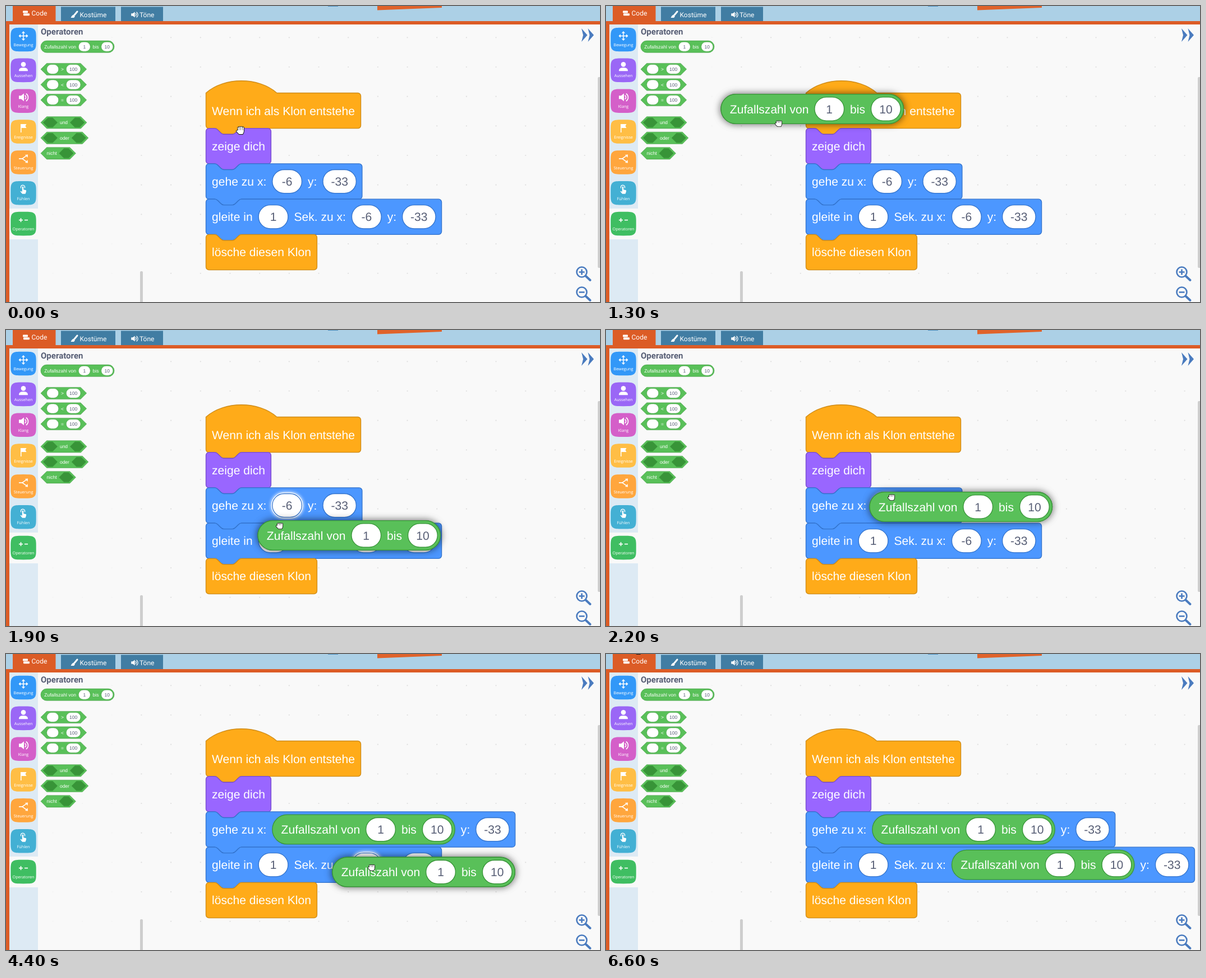
These frames come from a looping animation (1059 px wide and 529 px high, 6.9 s). An HTML page with a canvas:

```html
<!DOCTYPE html>
<html lang="de">
<head>
<meta charset="utf-8">
<title>Blöcke ziehen</title>
<style>
html, body { margin: 0; width: 100%; height: 100%; overflow: hidden; background: #f9f9f9; }
canvas { display: block; }
</style>
</head>
<body>
<canvas id="stage" width="1059" height="529"></canvas>
<script>
const ctx = document.getElementById('stage').getContext('2d');
ctx.textRendering = 'geometricPrecision';

const LOOP = 6900;
const ZOOM = 1.317;          // script scale: pixels per block unit
const PALETTE_ZOOM = 0.53;
const ROW = 48, GAP = 8;     // block units
const BLOCK_FONT = '"Liberation Sans", Arial, sans-serif';
const UI_FONT = 'Roboto, sans-serif';
const ORANGE = ['#ffab19', '#cf8b17'];
const PURPLE = ['#9966ff', '#774dcb'];
const BLUE = ['#4c97ff', '#3373cc'];
const GREEN = ['#59c059', '#389438'];
const INK = '#575e75';
const FRAME = '#dc5c26', TAB = '#417da3', CONTROL = '#4a7bbf', BAR = '#cecece';

// ---------- helpers ----------
function at(x, y, scale, draw) {
  ctx.save();
  ctx.translate(x, y);
  ctx.scale(scale, scale);
  draw();
  ctx.restore();
}

function text(str, x, y, size, color = '#fff', align = 'left', family = BLOCK_FONT, weight = 400) {
  ctx.font = `${weight} ${size}px ${family}`;
  ctx.fillStyle = color;
  ctx.textAlign = align;
  ctx.fillText(str, x, y);
}

function rect(x, y, w, h, fill, r = 0) {
  ctx.beginPath();
  ctx.roundRect(x, y, w, h, r);
  ctx.fillStyle = fill;
  ctx.fill();
}

function disc(x, y, r, fill) {
  ctx.beginPath();
  ctx.arc(x, y, r, 0, 7);
  ctx.fillStyle = fill;
  ctx.fill();
}

function poly(points, fill) {
  ctx.beginPath();
  points.forEach(([x, y]) => ctx.lineTo(x, y));
  ctx.closePath();
  ctx.fillStyle = fill;
  ctx.fill();
}

function line(points, color, width, cap = 'butt') {
  ctx.beginPath();
  points.forEach(([x, y]) => ctx.lineTo(x, y));
  outline(color, width, cap);
}

function outline(color, width = 1, cap = 'butt') {
  ctx.strokeStyle = color;
  ctx.lineWidth = width;
  ctx.lineCap = cap;
  ctx.lineJoin = 'round';
  ctx.stroke();
}

function pill(x, cy, w, h, [fill, stroke], width = 1) {
  rect(x, cy - h / 2, w, h, fill, h / 2);
  if (stroke) outline(stroke, width);
}

function hexagon(x, cy, w, h, [fill, stroke]) {
  const p = h / 2, r = x + w;
  poly([[x, cy], [x + p, cy - p], [r - p, cy - p], [r, cy], [r - p, cy + p], [x + p, cy + p]], fill);
  outline(stroke);
}

function withShadow(color, blur, draw) {
  ctx.save();
  ctx.shadowColor = color;
  ctx.shadowBlur = blur;
  draw();
  ctx.restore();
}

// ---------- block contents: a string, {num}, {slot} or {round: [...]} ----------
const PADDING = {
  round: { label: 12, num: 4 },
  hex: { label: 20, num: 20, slot: 8 },
  stack: { label: 8, num: 8, round: 8 }
};
const kind = piece => typeof piece === 'string' ? 'label' : Object.keys(piece)[0];

function textWidth(str) {
  ctx.font = `16px ${BLOCK_FONT}`;
  return ctx.measureText(str).width;
}

const WIDTH = {
  label: textWidth,
  num: p => Math.max(40, textWidth(p.num) + 22),
  slot: () => 48,
  round: p => rowWidth(p.round, 'round')
};
const pieceWidth = piece => WIDTH[kind(piece)](piece);

function rowWidth(pieces, shape) {
  const pads = PADDING[shape];
  const inner = pieces.reduce((sum, p) => sum + pieceWidth(p) + GAP, -GAP);
  return pads[kind(pieces[0])] + inner + pads[kind(pieces.at(-1))];
}

function drawRow(pieces, shape, x, cy, stroke) {
  x += PADDING[shape][kind(pieces[0])];
  for (const piece of pieces) {
    const w = pieceWidth(piece);
    DRAW[kind(piece)](piece, x, cy, w, stroke);
    x += w + GAP;
  }
}

const DRAW = {
  label: (str, x, cy) => text(str, x, cy + 5.7, 16),
  num(p, x, cy, w, stroke) {
    if (p.glow) withShadow('#fff', 6, () => pill(x, cy, w, 32, ['#fff', '#fff'], 3));
    pill(x, cy, w, 32, ['#fff', stroke]);
    text(p.num, x + w / 2, cy + 5.7, 16, INK, 'center');
  },
  slot: (p, x, cy, w, stroke) => hexagon(x, cy, w, 32, [stroke, stroke]),
  round(p, x, cy, w) {
    pill(x, cy, w, 40, GREEN);
    drawRow(p.round, 'round', x, cy, GREEN[1]);
  }
};

const num = (value, glow) => ({ num: value, glow });
const RANDOM = { round: ['Zufallszahl von', num('1'), 'bis', num('10')] };
const SLOT = { slot: true };

// ---------- script ----------
function blockPath(w, hat, cap) {
  const notch = 'c2,0 3,1 4,2l4,4c1,1 2,2 4,2h12c2,0 3,-1 4,-2l4,-4c1,-1 2,-2 4,-2';
  const back = 'H48c-2,0 -3,1 -4,2l-4,4c-1,1 -2,2 -4,2h-12c-2,0 -3,-1 -4,-2l-4,-4c-1,-1 -2,-2 -4,-2';
  const top = hat ? 'M0,0c25,-22 71,-22 96,0' : 'M0,4a4,4 0 0 1 4,-4H12' + notch;
  return new Path2D(`${top}H${w - 4}a4,4 0 0 1 4,4V44a4,4 0 0 1 -4,4${cap ? '' : back}H4a4,4 0 0 1 -4,-4z`);
}

function script(t) {
  const first = t >= 4000 ? RANDOM : num('-6', t >= 1600);
  const second = t >= 5000 ? RANDOM : num('-6', t >= 4400);
  const rows = [
    [ORANGE, 'Wenn ich als Klon entstehe'],
    [PURPLE, 'zeige dich'],
    [BLUE, 'gehe zu x:', first, 'y:', num('-33')],
    [BLUE, 'gleite in', num('1'), 'Sek. zu x:', second, 'y:', num('-33')],
    [ORANGE, 'lösche diesen Klon']
  ];
  at(356.5, 155.5, ZOOM, () => rows.forEach(([[fill, stroke], ...pieces], i) => {
    const path = blockPath(rowWidth(pieces, 'stack'), i === 0, i === rows.length - 1);
    ctx.fillStyle = fill;
    ctx.fill(path);
    ctx.strokeStyle = stroke;
    ctx.lineWidth = 1;
    ctx.stroke(path);
    drawRow(pieces, 'stack', 0, ROW / 2, stroke);
    ctx.translate(0, ROW);
  }));
}

function draggedBlock(x, y) {
  at(x, y, ZOOM, () => {
    const w = pieceWidth(RANDOM);
    withShadow('rgba(0,0,0,.6)', 13, () => pill(0, 0, w, 40, GREEN));
    DRAW.round(RANDOM, 0, 0, w);
  });
}

// ---------- palette ----------
function palette() {
  text('Operatoren', 62, 51.3, 15, INK, 'left', UI_FONT, 700);
  at(62, 72.7, PALETTE_ZOOM, () => DRAW.round(RANDOM, 0, 0, pieceWidth(RANDOM)));
  const compare = ['>', '<', '='].map(op => [num(''), op, num('100')]);
  const logic = [[SLOT, 'und', SLOT], [SLOT, 'oder', SLOT], ['nicht', SLOT]];
  [compare, logic].forEach((group, g) => group.forEach((pieces, i) => {
    at(62, 113 + g * 95.3 + i * 27.5, PALETTE_ZOOM, () => {
      hexagon(0, 0, rowWidth(pieces, 'hex'), 40, GREEN);
      drawRow(pieces, 'hex', 0, 0, GREEN[1]);
    });
  }));
}

// ---------- icons, drawn around 0,0 ----------
function speaker() {
  poly([[-8, -3], [-4, -3], [1, -7], [1, 7], [-4, 3], [-8, 3]], '#fff');
  [4, 8].forEach(r => {
    ctx.beginPath();
    ctx.arc(0.5, 0, r, -1, 1);
    outline('#fff', 1.7);
  });
}

function moveIcon() {
  for (let i = 0; i < 4; i++) {
    line([[0, 0], [6, 0]], '#fff', 1.5);
    poly([[8.5, 0], [5, -3.2], [5, 3.2]], '#fff');
    ctx.rotate(Math.PI / 2);
  }
}

function person() {
  disc(0, -4, 4.3, '#fff');
  rect(-8, 1.8, 16, 6.2, '#fff', [6, 6, 1, 1]);
}

function flag() {
  poly([[-5, -7], [5.5, -7], [3.5, -3.5], [5.5, 0], [-3.5, 0], [-3.5, 8], [-5, 8]], '#fff');
}

function branch() {
  line([[-8, 0], [-2, 0]], '#fff', 1.7);
  [-1, 1].forEach(s => {
    line([[-2, 0], [5, 5 * s]], '#fff', 1.7);
    poly([[8, 7.5 * s], [7.5, 2 * s], [3, 7 * s]], '#fff');
  });
}

function finger() {
  ctx.beginPath();
  ctx.arc(-1, -4, 3.6, 2.6, 6.8);
  outline('#fff', 1.3);
  line([[-1, -4], [-1, 4]], '#fff', 2.4, 'round');
  poly([[-1, 0], [5, 1.5], [5, 4], [3.5, 8], [-2, 8], [-6, 3], [-2, 4]], '#fff');
}

function plusMinus() {
  line([[-8, 0], [-1, 0]], '#fff', 1.7);
  line([[-4.5, -3.5], [-4.5, 3.5]], '#fff', 1.7);
  line([[2, 0], [8, 0]], '#fff', 1.7);
}

function brush() {
  line([[5, -5.5], [0, 0.5]], '#fff', 3, 'round');
  poly([[-2, 0], [1, 3], [-1, 5.5], [-6.5, 5.5], [-4.5, 2]], '#fff');
}

function codeIcon() {
  rect(-6, -4.5, 9, 4, '#fff', 1);
  rect(-5, 0.3, 11, 4, '#fff', 1);
}

// ---------- surroundings ----------
const CATEGORIES = [
  ['Bewegung', '#3298f8', moveIcon], ['Aussehen', '#9a67f6', person], ['Klang', '#d45fc9', speaker],
  ['Ereignisse', '#ffbe45', flag], ['Steuerung', '#ffa63d', branch], ['Fühlen', '#43b0d4', finger],
  ['Operatoren', '#3fbe62', plusMinus]
];

function bulgingSquare(w, h, fill) {
  const bulge = v => Math.sign(v) * Math.abs(v) ** 0.45;
  const points = Array.from({ length: 64 }, (_, i) => i * Math.PI / 32)
    .map(a => [w * bulge(Math.cos(a)), h * bulge(Math.sin(a))]);
  poly(points, fill);
}

function categories() {
  rect(6, 33, 51, 496, '#ddeaf4');
  rect(6, 362, 51, 55, '#f9f9f9');
  CATEGORIES.forEach(([name, color, icon], i) => at(31, 60 + i * 54.85, 1, () => {
    bulgingSquare(22.7, 21.3, color);
    text(name, 0, 12.3, 7.2, '#fff', 'center', '"Open Sans", sans-serif');
    ctx.translate(0, -6.5);
    icon();
  }));
}

function header() {
  rect(0, 0, 1059, 27, '#acd0e6');
  poly([[662, 0], [777, 0], [777, 3], [662, 7.5]], '#e0622a');
  rect(574, 0, 18, 1, '#4c8fc0');
  rect(98, 1.5, 97, 26, TAB);
  rect(205, 1.5, 75, 26, TAB);
  rect(12, 0, 76.5, 27, FRAME);
  rect(0, 27, 1059, 6, FRAME);
  rect(0, 27, 6, 502, FRAME);
  at(36, 13, 1, codeIcon);
  at(122, 15.5, 1, brush);
  at(229, 15.5, 0.72, speaker);
  text('Code', 45.5, 17, 12, '#fff', 'left', UI_FONT);
  text('Kostüme', 131.5, 20, 12, '#fff', 'left', UI_FONT);
  text('Töne', 238, 20, 12, '#fff', 'left', UI_FONT);
}

function grid() {
  const pitch = 40 * ZOOM;
  for (let x = 83.4; x < 1059; x += pitch)
    for (let y = 56.3; y < 529; y += pitch)
      disc(x, y, 1.1, x < 240 ? '#f3f3f3' : '#dedede');
}

function magnifier(plus) {
  ctx.beginPath();
  ctx.arc(0, 0, 9, 0, 7);
  outline(CONTROL, 2.6);
  line([[7, 7], [15, 14.5]], CONTROL, 4, 'round');
  line([[-5, 0], [5, 0]], CONTROL, 2.6);
  if (plus) line([[0, -5], [0, 5]], CONTROL, 2.6);
}

function controls() {
  [1026, 1037.5].forEach(x => poly([[x, 40], [x + 10.5, 52], [x, 64], [x + 3, 52]], CONTROL));
  at(1026.5, 475.5, 1, () => magnifier(true));
  at(1026.5, 511.5, 1, () => magnifier(false));
  rect(1055, 127, 6, 341, BAR, 2);
  rect(239, 474, 5, 60, BAR, 2);
}

// ---------- cursor ----------
function hand(closed) {
  const reach = closed ? 4 : 5.5;
  const layer = (color, grow) => {
    for (let i = 0; i < 4; i++) {
      const tip = -reach - Math.sin(i * 1.05) * (closed ? 0.4 : 1);
      line([[-3.6 + i * 2.8, tip], [-3 + i * 2.5, 1]], color, 2.2 + grow, 'round');
    }
    line([[-6, 0.5], [-3, 3.5]], color, 2.2 + grow, 'round');
    poly([[-5, -1], [6, -1], [5.5, 3], [4, 6], [-2.5, 6], [-6, 2]], color);
    if (grow) outline(color, grow);
  };
  layer('#111', 1.8);
  layer('#fff', 0);
}

// ---------- motion: key points [time, x, y], eased and sampled in steps ----------
const SCENES = [
  {
    start: 0, step: 100,
    hand: [[0, 418, 223], [700, 113, 72], [800, 103, 76], [1000, 103, 76], [1300, 308, 210],
      [1500, 739, 288], [1600, 468, 310], [1900, 488, 350], [2200, 509, 299]],
    block: [[1100, 98, 85], [1300, 205, 184], [1500, 700, 305], [1600, 428, 327.5],
      [1900, 449, 367], [2200, 470, 316]]
  },
  {
    start: 4000, step: 100,
    hand: [[4000, 391, 260], [4100, 520, 369], [4200, 520, 369], [4500, 698, 386], [4600, 680, 377]],
    block: [[4000, 249, 217], [4100, 450, 377], [4200, 450, 377], [4500, 628, 394], [4600, 610, 385]]
  },
  {
    start: 5000, step: 200,
    hand: [[5800, 680, 377], [6000, 317, 233], [6200, 82, 28], [6400, 60, 8], [6600, 57, -6]]
  }
];

function follow(keys, t) {
  const next = keys.findIndex(k => k[0] > t);
  if (next < 0) return keys.at(-1).slice(1);
  const [t1, x1, y1] = keys[next];
  const [t0, x0, y0] = keys[Math.max(0, next - 1)];
  const u = t1 > t0 ? (t - t0) / (t1 - t0) : 0;
  const e = u * u * (3 - 2 * u);
  return [x0 + (x1 - x0) * e, y0 + (y1 - y0) * e];
}

function draw(t) {
  const scene = SCENES.findLast(s => s.start <= t);
  const time = Math.floor(t / scene.step) * scene.step;
  const dragging = scene.block && time >= scene.block[0][0];
  rect(0, 0, 1059, 529, '#f9f9f9');
  grid();
  header();
  categories();
  palette();
  script(t);
  controls();
  if (dragging) draggedBlock(...follow(scene.block, time));
  const closed = t >= 1000 && t < 5000;
  at(...follow(scene.hand, time), closed ? 0.88 : 1, () => hand(closed));
}

function tick() {
  draw(performance.now() % LOOP);
  requestAnimationFrame(tick);
}
tick();
</script>
</body>
</html>
```
